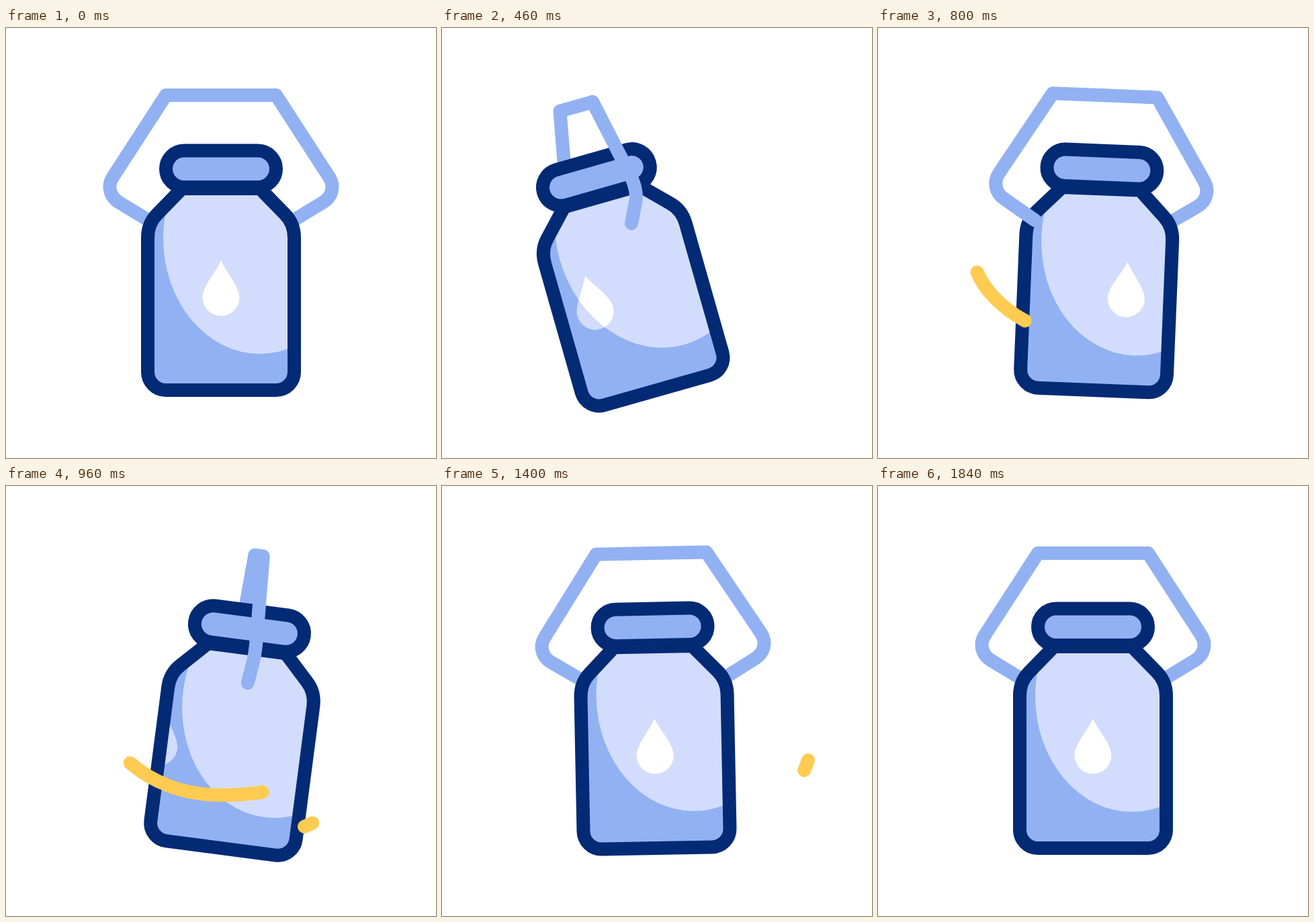
An HTML page with a canvas for the animation above (2.4 s loop, 640 by 640 pixels).

```html
<!DOCTYPE html>
<html lang="en">
<head>
<meta charset="utf-8">
<title>Swinging milk bottle</title>
<style>
html, body { margin: 0; width: 100%; height: 100%; overflow: hidden; background: #fff; }
canvas { display: block; width: 100vw; height: 100vh; }
</style>
</head>
<body>
<canvas id="stage" width="640" height="640"></canvas>
<script>
const ctx = document.getElementById('stage').getContext('2d');
const LOOP = 2400;
const NAVY = '#032a75', BLUE = '#92b1f3', LIGHT = '#d2dcfd', YELLOW = '#ffcb50';
const CX = 320, BASE = 539;

// keyframes: [time, value]
const SWING = [[0, 0], [586, -18], [900, 8.6], [1220, -4], [1580, 1.7], [1840, 0]];
const SPIN = [[0, 0], [483, 72.5], [1268, -180]];
const SLIDE = [[0, 0], [560, -61.3], [1210, 277]];
const DROP_GAP = 277;

const rad = deg => deg * Math.PI / 180;

function ease(t, from, to) {
  const x = Math.min(1, Math.max(0, (t - from) / (to - from)));
  return x * x * (3 - 2 * x);
}

function track(keys, t) {
  let v = keys[0][1];
  for (let i = 1; i < keys.length; i++) {
    v += (keys[i][1] - keys[i - 1][1]) * ease(t, keys[i - 1][0], keys[i][0]);
  }
  return v;
}

// chain of cubic curves: start point, then six numbers per curve
function makeTrail(start, curves, head, tail) {
  const path = new Path2D();
  path.moveTo(...start);
  let [x0, y0] = start, px = x0, py = y0, length = 0;
  for (const c of curves) {
    path.bezierCurveTo(...c);
    for (let i = 1; i <= 60; i++) {
      const t = i / 60, u = 1 - t;
      const at = (a, b, d, e) => u * u * u * a + 3 * u * u * t * b + 3 * u * t * t * d + t * t * t * e;
      const x = at(x0, c[0], c[2], c[4]), y = at(y0, c[1], c[3], c[5]);
      length += Math.hypot(x - px, y - py);
      px = x;
      py = y;
    }
    [x0, y0] = [c[4], c[5]];
  }
  return { path, length, head, tail };
}

const trails = [
  makeTrail([147.5, 363.5], [
    [165, 405, 225, 460, 320, 460],
    [400, 460, 482, 440, 494, 375]
  ], [612, 1195], [830, 1370]),
  makeTrail([444, 507], [[490, 488, 530, 455, 545, 408]], [871, 1353], [1054, 1492])
];

const body = new Path2D(
  'M262 239 L225 277 C216 286 211 299 211 312 V512 A27 27 0 0 0 238 539 ' +
  'H402 A27 27 0 0 0 429 512 V312 C429 299 424 286 415 277 L378 239 Z');
const lid = new Path2D();
lid.roundRect(238, 182.5, 164, 54.5, 27.25);
const shine = new Path2D();
shine.ellipse(378, 313, 144, 172, 0, 0, Math.PI * 2);
const drop = new Path2D(
  'M320 346 C313 363 292.5 384 292.5 401 A27.5 27.5 0 0 0 347.5 401 C347.5 384 327 363 320 346 Z');

function fill(path, color) {
  ctx.fillStyle = color;
  ctx.fill(path);
}

function stroke(path, color) {
  ctx.strokeStyle = color;
  ctx.stroke(path);
}

function handleHalf(side, turn) {
  const k = side * Math.cos(turn), x = d => CX + d * k;
  const p = new Path2D();
  p.moveTo(CX, 100);
  p.lineTo(x(82), 100);
  p.lineTo(x(161), 222);
  p.bezierCurveTo(x(170), 236, x(165), 252, x(151), 260);
  p.lineTo(x(101.6), 290);
  stroke(p, BLUE);
}

function drops(slide, color) {
  for (const dx of [slide, slide - DROP_GAP]) {
    ctx.save();
    ctx.translate(dx, 0);
    fill(drop, color);
    ctx.restore();
  }
}

function bottle(slide) {
  ctx.save();
  ctx.clip(body);
  fill(body, BLUE);
  drops(slide, LIGHT);
  fill(shine, LIGHT);
  ctx.clip(shine);
  drops(slide, '#fff');
  ctx.restore();
  stroke(body, NAVY);
  fill(lid, BLUE);
  stroke(lid, NAVY);
}

function drawTrail(trail, t) {
  const from = ease(t, ...trail.tail) * trail.length;
  const to = ease(t, ...trail.head) * trail.length;
  if (to - from < 0.5) return;
  ctx.save();
  ctx.setLineDash([to - from, trail.length * 2]);
  ctx.lineDashOffset = -from;
  stroke(trail.path, YELLOW);
  ctx.restore();
}

function draw(t) {
  ctx.fillStyle = '#fff';
  ctx.fillRect(0, 0, 640, 640);
  ctx.lineWidth = 20;
  ctx.lineCap = ctx.lineJoin = 'round';

  const turn = rad(track(SPIN, t));
  const inFront = side => side * Math.sin(turn) > 0.12;

  ctx.save();
  ctx.translate(CX, BASE);
  ctx.rotate(rad(track(SWING, t)));
  ctx.translate(-CX, -BASE);
  for (const side of [-1, 1]) if (!inFront(side)) handleHalf(side, turn);
  bottle(track(SLIDE, t));
  for (const side of [-1, 1]) if (inFront(side)) handleHalf(side, turn);
  ctx.restore();

  for (const trail of trails) drawTrail(trail, t);
}

const begin = performance.now();
function tick() {
  draw((performance.now() - begin) % LOOP);
  requestAnimationFrame(tick);
}
tick();
</script>
</body>
</html>
```
